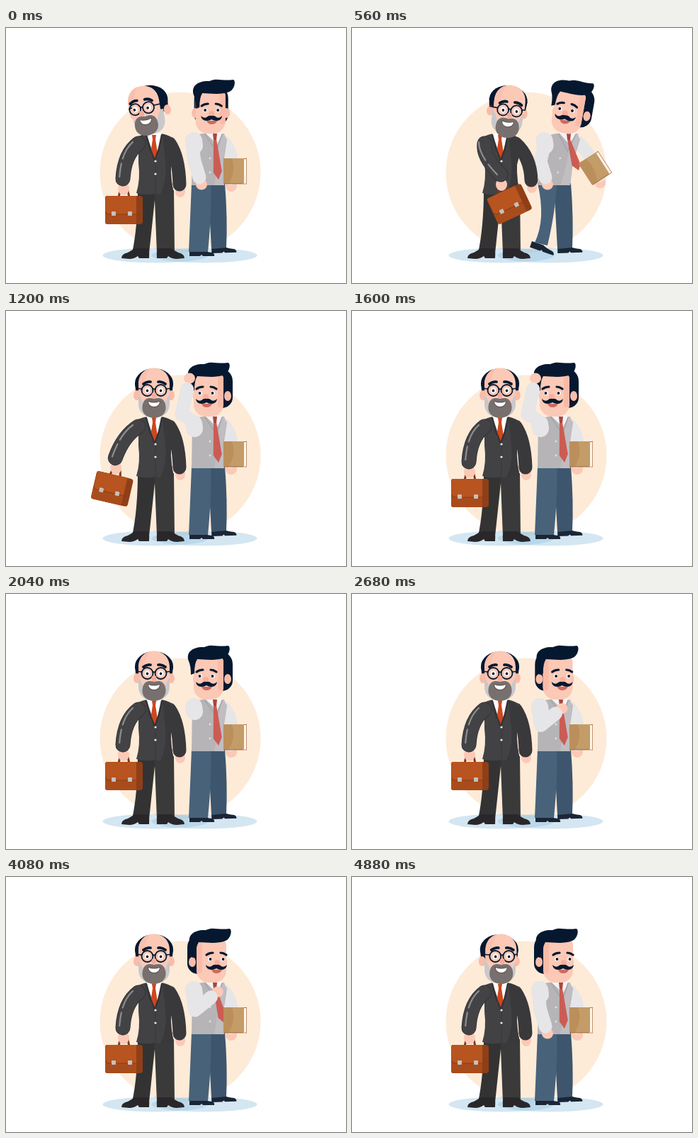
An HTML page with a canvas that plays this animation: 480 by 360 pixels, repeating every 4920 ms.

```html
<!DOCTYPE html>
<html>
<head>
<meta charset="utf-8">
<style>
html, body { margin: 0; width: 100%; height: 100%; overflow: hidden; background: #fff; }
canvas { display: block; width: 480px; height: 360px; }
</style>
</head>
<body>
<canvas id="stage" width="480" height="360"></canvas>
<script>
const ctx = document.getElementById('stage').getContext('2d');
const LOOP = 4920, STEP = 40, CUT = 1160;
const NAVY = '#06182f', SKIN = '#fbc9b6', EAR = '#f8bca9', SLEEVE = '#e6e5e7';

// Motion helpers
const ramp = (t, a, b) => {
  const u = Math.min(1, Math.max(0, (t - a) / (b - a)));
  return u * u * (3 - 2 * u);
};
const pulse = (t, a, b, c, d) => ramp(t, a, b) - ramp(t, c, d);
const mix = (p, q, u) => p.map((v, i) => v + (q[i] - v) * u);

// The case swings forward, then out to the side, then settles.
function elderPose(t) {
  const left = 1 - ramp(t, 0, 400);
  const lean = pulse(t, 0, 560, 560, 1040);
  const out = pulse(t, 720, 1100, 1100, 1420);
  return {
    head: 209 - 4 * left + 8 * lean,
    turn: -left + .3 * lean + .35 * ramp(t, 4400, 4880),
    tilt: -9 * left + 6 * lean,
    nod: 4 * lean,
    hand: [166 + 45 * lean - 14 * out, 226 - 6 * lean - 7 * out],
    elbow: [167 + 17 * lean - 2 * out, 188 + 4 * lean - 2 * out],
    swing: -25 * lean + 17 * out,
    far: [246 + 8 * lean, 232 - 6 * lean]
  };
}

// Arm poses: elbow x, y, hand x, y
const POCKET = [266, 188, 276, 221], SCRATCH = [248, 146, 259, 95];
const FOLD = [263, 158, 268, 158], HOLD = [267, 188, 299, 162];

// He leans in and flings the book, then cuts to scratching his head and fixing his tie.
function clerkPose(t) {
  const before = t < CUT;
  const lean = before ? pulse(t, 0, 560, 560, 1500) : 0;
  const fling = before ? ramp(t, 560, 1120) : 0;
  const around = ramp(t, 2140, 2800);
  let arm = POCKET;
  if (!before) {
    arm = mix(SCRATCH, FOLD, ramp(t, 1640, 2040));
    arm = mix(arm, HOLD, around);
    arm = mix(arm, POCKET, ramp(t, 4240, 4760));
  }
  const sway = pulse(t, 3760, 4080, 4080, 4440);
  return {
    lean, arm,
    head: 289 + 14 * lean - around - sway,
    turn: before ? -.1 - .9 * lean : 2 * around - 1,
    tilt: 10 * lean,
    book: [323 + 20 * lean + 34 * fling, 202 - 4 * lean - 8 * fling],
    spin: -33 * lean - 37 * fling,
    tie: [300 + 20 * lean + 9 * sway, 214 - 13 * lean - 7 * sway]
  };
}

// Drawing helpers
function shape(d, fill) {
  ctx.fillStyle = fill;
  ctx.fill(new Path2D(d));
}

function line(d, color, width) {
  ctx.strokeStyle = color;
  ctx.lineWidth = width;
  ctx.lineCap = ctx.lineJoin = 'round';
  ctx.stroke(new Path2D(d));
}

function oval(x, y, rx, ry, fill) {
  ctx.beginPath();
  ctx.ellipse(x, y, rx, ry, 0, 0, Math.PI * 2);
  ctx.fillStyle = fill;
  ctx.fill();
}

function box(x, y, w, h, r, fill) {
  ctx.beginPath();
  ctx.roundRect(x, y, w, h, r);
  ctx.fillStyle = fill;
  ctx.fill();
}

function at(x, y, angle, draw, pivot = 0) {
  ctx.save();
  ctx.translate(x, y + pivot);
  ctx.rotate(angle * Math.PI / 180);
  ctx.translate(0, -pivot);
  draw();
  ctx.restore();
}

function backdrop() {
  oval(246, 204, 113.5, 113.5, '#fdebd8');
  for (const x of [211, 280]) oval(x, 321, 74.5, 10.5, 'rgba(150,195,225,.42)');
}

function elderHead({ turn, nod }) {
  const back = -turn * 3.5;
  oval(back, -10, 27, 21, NAVY);
  shape(`M${back - 27} -10 L${back - 25} 9 H${back + 25} L${back + 27} -10 Z`, NAVY);
  for (const s of [-1, 1]) oval(s * 24 + back, 7, 5, 7, EAR);
  shape('M-22 5 H22 V18 C22 33 12 38 0 38 C-12 38 -22 33 -22 18 Z', '#c9c8ca');
  at(turn * 4, 0, 0, () => {
    shape('M-22 -9 C-22 -39 22 -39 22 -9 V6 C18 10 17 17 12 24 H-12 C-17 17 -18 10 -22 6 Z', SKIN);
    shape('M-22 -9 C-21 -21 -14 -30 -5 -31 C-13 -22 -15 -8 -15 8 L-22 6 Z', '#f9c0ad');
  });
  at(turn * 5, nod, 0, () => {
    shape('M-16 20 C-14 10 -6 10 0 12 C6 10 14 10 16 20 C19 33 9 39 0 39 C-9 39 -19 33 -16 20 Z', '#77706f');
    shape('M-9 15 Q0 18 9 15 Q8 24 0 24 Q-8 24 -9 15 Z', '#5b4a49');
    shape('M-8 16 Q0 19 8 16 Q7 23 0 23 Q-7 23 -8 16 Z', '#fff');
  });
  at(turn * 8, nod, 0, () => {
    line('M-15 -9 Q-10 -13 -5 -12', NAVY, 3.8);
    line('M6 -12 Q11 -13 16 -9', NAVY, 3.8);
    for (const x of [-9.5, 9.5]) {
      oval(x, 0, 3.6, 4, '#fff');
      oval(x + turn, .5, 1.8, 2, NAVY);
      ctx.beginPath();
      ctx.arc(x, 0, 8, 0, Math.PI * 2);
      ctx.strokeStyle = NAVY;
      ctx.lineWidth = 1.8;
      ctx.stroke();
    }
    line('M-1.5 -1 Q0 -3 1.5 -1', NAVY, 1.7);
    line(`M17.5 -2 L${25 - turn * 11} -3 M-17.5 -2 L${-25 - turn * 11} -3`, NAVY, 1.7);
    oval(turn, 7, 3.6, 4, '#f4ac9b');
  });
}

function briefcase() {
  line('M-7 8 L-5 -1 H6 L8 8', '#7e371a', 3);
  box(-26, 6, 53, 40, 4, '#8f3f18');
  box(-26, 6, 44, 40, 3, '#a94c1c');
  shape('M-25 6 H18 V32 H-20 Q-25 32 -25 27 Z', '#b7541f');
  line('M-25 29 Q-24 32 -19 32 H18 Q24 32 26 28', '#8c3d17', 1.2);
  for (const x of [-17, 6]) box(x, 28, 6, 6, 1, '#c6c0bc');
}

function shoe(fill, flip = 1) {
  ctx.scale(flip, 1);
  shape('M0 11 Q0 5 9 3 Q15 0 18 -3 H38 Q40 4 39 11 H25 L23 8 Q18 12 11 12 Z', fill);
}

function drawElder(t) {
  const p = elderPose(t);
  const [ex, ey] = p.elbow, [x, y] = p.hand, [fx, fy] = p.far;

  shape('M186 229 H212 L210 243 L202 318 H178 Q186 280 186 229 Z', '#333334');
  shape('M209 229 H237 L238 318 H213 L210 243 Z', '#3a3a3b');
  at(163, 314, 0, () => shoe('#29272a'));
  at(252, 314, 0, () => shoe('#29272a', -1));

  oval(fx, fy - 1, 7, 8, SKIN);
  line(`M231 163 Q${fx - 2} 182 ${fx - 1} ${fy - 11}`, '#39383b', 19);
  shape('M187 153 Q199 147 210 150 Q223 147 235 155 L233 190 Q232 214 237 233 Q222 237 211 234 Q195 237 184 233 Q190 214 187 190 Z', '#424244');
  shape('M221 150 Q237 153 239 169 L233 193 Q232 214 237 233 Q226 236 218 235 Q229 212 224 180 Z', '#39383b');
  shape('M198 149 H220 L211 187 Z', '#fff');
  shape('M206 151 H212 L211 157 L214 177 L209 185 L204 177 L207 157 Z', '#cf471d');
  line('M198 151 L203 170 L210 187 L216 170 L220 151', '#343437', 2.5);
  line('M211 187 V233', '#363639', .8);
  for (const b of [188, 206]) oval(211, b, 1.6, 1.6, '#e9e9e9');

  at(x, y + 5, p.swing, briefcase);
  oval(x, y + 1, 8, 9, SKIN);
  const sleeve = `M187 163 Q${ex} ${ey - 10} ${x - 1} ${y - 13}`;
  line(sleeve, '#303033', 21);
  line(sleeve, '#434346', 19.5);
  ctx.setLineDash([28, 7, 19, 80]);
  line(`M179 161 Q${ex - 5} ${ey - 12} ${x - 6} ${y - 13}`, '#8e8e91', 2.2);
  ctx.setLineDash([]);

  at(p.head, 112, p.tilt, () => elderHead(p), 35);
}

function clerkHead(turn) {
  box(-24 - turn * 7, -34, 48, 56, [18, 18, 15, 15], NAVY);
  for (const s of [-1, 1]) oval(s * 22 - turn * 2, 5, 5, 7, EAR);
  at(turn * 3, 0, 0, () => {
    box(-21, -27, 42, 61, [8, 8, 17, 17], SKIN);
    box(turn > 0 ? -21 : 13, -24, 8, 45, 4, '#f9bba8');
  });
  // The quiff sits forward when he faces the viewer.
  at(5 - 6 * Math.abs(turn) + turn * 2, 0, 0, () => {
    shape('M-28 -20 C-33 -33 -22 -41 -6 -40 C4 -45 12 -40 27 -42 C32 -42 30 -28 22 -25 C10 -20 -6 -23 -16 -23 Q-20 -17 -20 -3 L-25 -1 Q-25 -14 -28 -20 Z', NAVY);
  });
  at(turn * 8 + 2, 0, 0, () => {
    line('M-14 -5 Q-10 -8 -5 -8', NAVY, 3.2);
    line('M6 -8 Q10 -8 14 -5', NAVY, 3.2);
    for (const x of [-9, 9]) {
      oval(x, 1, 2.8, 3, '#fff');
      oval(x + turn * .5, 1, 1.9, 2.1, NAVY);
    }
    oval(turn, 6, 4, 4, '#f6b09f');
    shape('M-7 16 H8 Q6 21 0 21 Q-5 21 -7 16 Z', '#cd6a60');
    shape('M0 9 Q4 8 7 11 Q11 13 15 9 Q14 16 7 16 Q3 16 0 14 Q-3 16 -7 16 Q-14 16 -15 9 Q-11 13 -7 11 Q-4 8 0 9 Z', NAVY);
  });
}

function book() {
  box(-16, -18, 33, 36, 1, '#a97843');
  shape('M12 -17 H17 V18 H12 Z', '#fff6e9');
  shape('M-16 -18 H13 V17 H-16 Z', '#c49c68');
  shape('M-16 -18 H-4 Q2 0 -8 17 H-16 Z', '#bb8f5c');
  line('M16.5 -18 V18 M-15 18 H16', '#b07a58', .8);
}

function clerkShoe() {
  shape('M0 0 H17 Q23 3 32 4 Q36 6 35 9 H19 L17 7 L15 9 H0 Z', '#1b2535');
}

function drawClerk(t) {
  const { lean, arm, head, turn, tilt, book: [bx, by], spin, tie: [tx, ty] } = clerkPose(t);
  const [ex, ey, x, y] = arm, shift = 11 * lean;

  at(290, 309, -2, clerkShoe);
  at(259 - lean * 5, 313 - lean * 12, lean * 19, clerkShoe);
  shape('M285 219 H309 Q313 270 311 310 L290 312 Z', '#3d566d');
  const hem = 316 - lean * 9;
  shape(`M262 219 H289 Q${291 - lean * 3} 255 ${285 - lean * 9} ${hem} L258 ${hem - lean * 4} Q${260 + lean * 14} 270 262 219 Z`, '#48627a');

  // The far hand stays under the book.
  const a = spin * Math.PI / 180, c = Math.cos(a), s = Math.sin(a);
  const gx = bx - 5 * c - 21 * s, gy = by - 5 * s + 21 * c;
  oval(gx, gy, 8, 8, SKIN);
  line(`M${308 + shift} 161 Q${(308 + gx) / 2 + 11} 181 ${gx - 1} ${gy - 10}`, SLEEVE, 18);

  ctx.save();
  ctx.transform(1, 0, -shift / 72, 1, shift * 222 / 72, 0);
  shape('M263 154 Q276 147 292 149 Q306 147 312 157 L307 190 L308 222 H262 Z', '#b6b4b7');
  shape('M297 149 H308 L311 158 L306 190 L308 222 H294 Q302 185 297 149 Z', '#c0bec1');
  shape('M281 148 H306 L298 164 Z', '#f4f3f4');
  line('M281 150 L297 174 L305 150', '#a7a5a9', 1.6);
  for (const b of [184, 204]) oval(288, b, 1.4, 1.4, '#dfdee1');
  ctx.restore();

  const kx = 295 + shift, mx = (kx + tx * 3) / 4, my = (150 + ty * 3) / 4;
  shape(`M${kx - 2} 157 H${kx + 2} L${mx + 6} ${my + 4} L${tx} ${ty} L${mx - 6} ${my + 6} Z`, '#cb5c54');
  shape(`M${kx - 3} 149 H${kx + 3} L${kx + 2} 158 H${kx - 2} Z`, '#a9473c');

  at(bx, by, spin, book);
  at(head, 115, tilt, () => clerkHead(turn), 33);

  oval(x, y, 8, 7.5, SKIN);
  const [wx, wy] = mix([ex, ey], [x, y], .7), sx = 266 + shift * .6;
  line(`M${sx} 160 Q${sx - 3} ${(160 + ey) / 2} ${ex} ${ey} L${wx} ${wy}`, SLEEVE, 19);
  line(`M${sx - 1} 159 L${sx} 166`, SLEEVE, 24);
}

const start = performance.now();

function frame() {
  const t = Math.floor((performance.now() - start) % LOOP / STEP) * STEP;
  ctx.clearRect(0, 0, 480, 360);
  backdrop();
  drawClerk(t);
  drawElder(t);
  requestAnimationFrame(frame);
}

frame();
</script>
</body>
</html>
```
